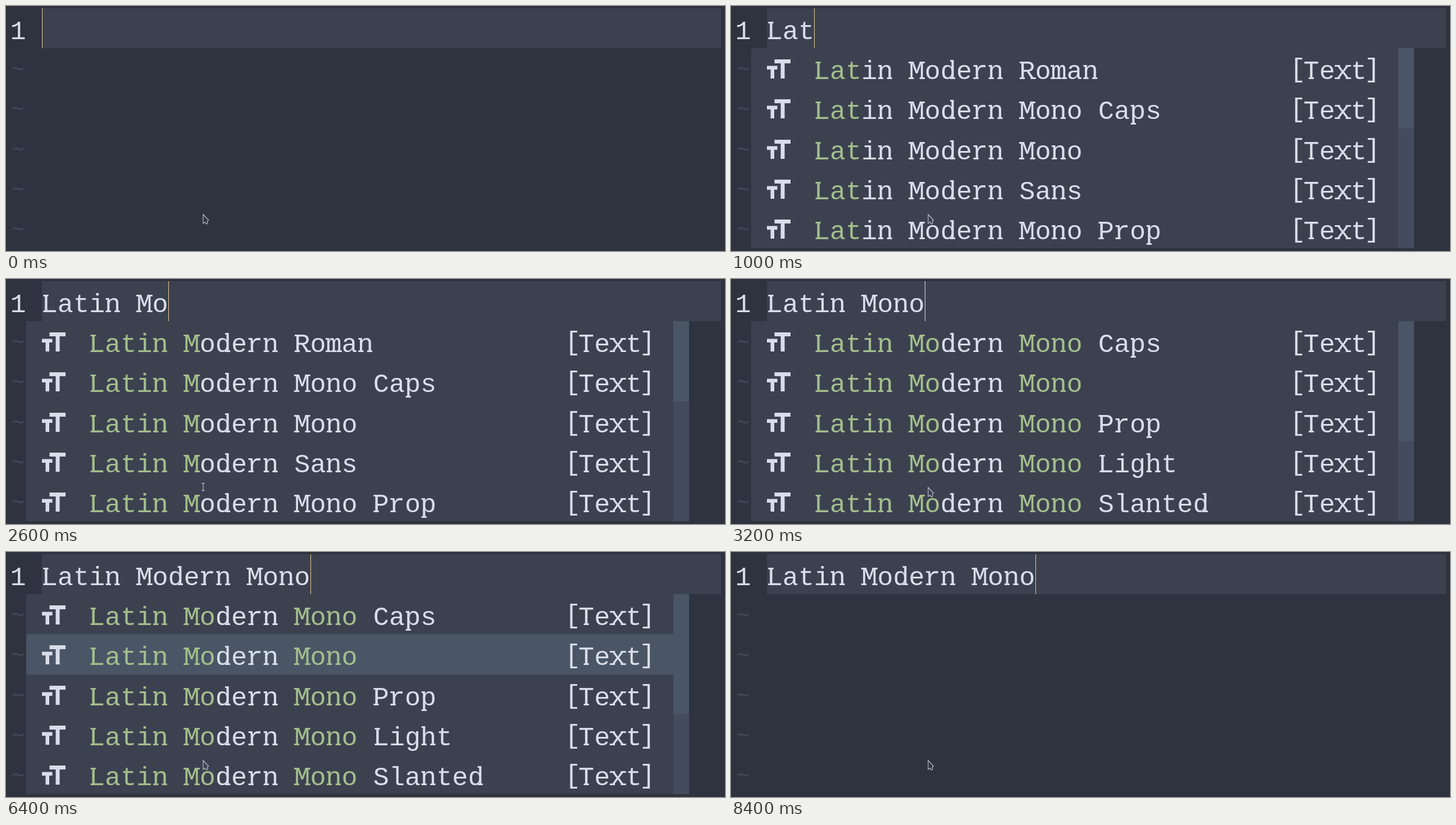
Animation, 1280 px wide and 436 px high, one loop 9000 ms. Source, as an HTML page:

```html
<!DOCTYPE html>
<html lang="en">
<head>
<meta charset="utf-8">
<title>Completion menu</title>
<style>
  html, body { margin: 0; width: 100%; height: 100%; overflow: hidden; background: #2f333f; }
  svg { display: block; width: 100vw; height: 100vh; }
  text { font: 46.83px "Liberation Mono", "Courier New", monospace; white-space: pre; }
  text.tilde { font-size: 38px; text-anchor: middle; stroke-width: .8; }
  .plain { fill: #d8dee9; stroke: #d8dee9; }
  .hit { fill: #a3be8c; stroke: #a3be8c; }
  .dim { fill: #414757; stroke: #414757; }
  text { stroke-width: 0; }
  .serif { stroke-width: 3; }
  .panel { fill: #3c4150; }
  .track { fill: #444b5d; }
  .raised { fill: #4a5566; }
  .icon { fill: #d8dee9; }
  .chevrons { fill: none; stroke: #d8dee9; stroke-width: 6.4; }
  .mouse { fill: none; stroke: #c3c8d1; stroke-width: 1.1; }
  #arrow { animation: arrow 9s step-end infinite; }
  #beam { animation: beam 9s step-end infinite; }
  @keyframes arrow { 0%, 35.5555% { opacity: 1 } 16.6666% { opacity: 0 } }
  @keyframes beam { 0%, 35.5555% { opacity: 0 } 16.6666% { opacity: 1 } }
</style>
</head>
<body>
<svg viewBox="0 0 1280 436">
  <defs>
    <path id="snippet" class="chevrons" d="M81.500 99L68.500 112L81.500 125M92.500 99L105.500 112L92.500 125"/>
    <path id="letters" class="icon" d="M77.500 95H106V102H95.500V129H88.500V102H77.500ZM64 106.500H82.500V113H77V129H70.500V113H64Z"/>
  </defs>
  <rect class="panel" x="64" y="4" width="1209" height="71"/>
  <text class="plain" x="7.500" y="59">1</text>
  <g id="tildes"></g>
  <g id="line"></g>
  <g id="menu"></g>
  <rect id="caret" y="4" width="1" height="71"/>
  <path id="arrow" class="mouse" d="M351 371V387L354.500 384.500L356.500 388L359 387L358.500 383L360.500 381Z"/>
  <path id="beam" class="mouse" d="M348 363.500H354M351 363.500V376.500M348 376.500H354"/>
</svg>
<script>
const LOOP = 9000, CELL = 28.1, ROW = 71.25, TOP = 75;
const get = id => document.getElementById(id);
const col = n => 7.5 + n * CELL;
const modern = names => names.split(',').map(n => 'Latin Modern ' + n);

const mixed = ['LGPL2~', 'LGPL3~', 'lorem~', ...modern('Roman,Mono Caps')];
const fonts = modern('Roman,Mono Caps,Mono,Sans,Mono Prop');
const monos = modern('Mono Caps,Mono,Mono Prop,Mono Light,Mono Slanted');

// head: matched letters at the start, tail: matched letters of the third word
const menu = (items, head, thumb, tail = 0, pick = -1) => ({ items, head, thumb, tail, pick });
const any = menu(mixed, 1, 1);
const latin = head => menu(fonts, head, 2);
const mono = (tail, pick) => menu(monos, 8, 3, tail, pick);

const steps = [
  [0, '', null],
  [400, 'L', null],
  [500, 'L', any],
  [700, 'La', any],
  [800, 'La', latin(2)],
  [900, 'Lat', latin(2)],
  [1000, 'Lat', latin(3)],
  [1100, 'Lati', latin(3)],
  [1200, 'Latin', latin(4)],
  [1300, 'Latin', latin(5)],
  [1500, 'Latin ', latin(5)],
  [1800, 'Latin M', latin(5)],
  [1900, 'Latin M', latin(7)],
  [2600, 'Latin Mo', latin(7)],
  [2700, 'Latin Mo', latin(8)],
  [2800, 'Latin Mon', latin(8)],
  [3000, 'Latin Mon', mono(3)],
  [3100, 'Latin Mono', mono(3)],
  [3200, 'Latin Mono', mono(4)],
  [4200, 'Latin Modern Mono Caps', mono(4, 0)],
  [6400, 'Latin Modern Mono', mono(4, 1)],
  [7700, 'Latin Modern Mono', null]
];

const rect = (cls, x, y, w, h) =>
  `<rect class="${cls}" x="${x}" y="${y}" width="${w}" height="${h}"/>`;
const text = (cls, x, y, s) => `<text class="${cls}" x="${x}" y="${y}">${s}</text>`;
const tilde = (cls, x, y) => text('tilde ' + cls, x + CELL / 2, y - 4.8, '~');
const rowTop = i => Math.round(TOP + i * ROW);
const baseline = i => rowTop(i) + 55;

// Slab serifs: top or bottom, then left, centre or right
const SERIFS = {
  L: 'tl bl', M: 'tl tr bl br', P: 'tl bl', R: 'tl bl br', T: 'bc',
  d: 'tr br', h: 'tl bl br', m: 'tl bl bc br', n: 'tl bl br',
  p: 'tl bl', r: 'tl bl', x: 'tl tr bl br'
};
const pen = document.createElement('canvas').getContext('2d');
pen.font = '46.83px "Liberation Mono", "Courier New", monospace';

function serifs(c, x, y) {
  if (!SERIFS[c]) return '';
  const m = pen.measureText(c);
  const left = -m.actualBoundingBoxLeft, right = m.actualBoundingBoxRight;
  const xs = { l: left + 2.2, c: (left + right) / 2, r: right - 2.2 };
  const ys = { t: 1.5 - m.actualBoundingBoxAscent, b: m.actualBoundingBoxDescent - 1.5 };
  return SERIFS[c].split(' ').map(([v, h]) => {
    const low = v === 't' && c > 'a' && c !== 'x';
    return `M${x + xs[h] - 4.6} ${y + ys[v]}h${low ? 6 : 9.2}`;
  }).join('');
}

function write(cls, x, y, s) {
  const d = [...s].map((c, i) => serifs(c, x + i * CELL, y)).join('');
  return text(cls, x, y, s) + `<path class="serif ${cls}" d="${d}"/>`;
}

function label(s, { head, tail }, y) {
  const name = s.replace('~', ''), cuts = [0, head, 13, 13 + tail];
  let out = cuts.map((from, i) =>
    write(i % 2 ? 'plain' : 'hit', col(5 + from), y, name.slice(from, cuts[i + 1]))).join('');
  if (name !== s) out += tilde('plain', col(5 + name.length), y);
  return out;
}

const kind = (s, y) => text('plain', col(35) + 4, y - 4, '[') +
  write('plain', col(36), y, s) + text('plain', col(36 + s.length) - 4, y - 4, ']');

function drawMenu(m) {
  if (!m) return '';
  const bar = m.items === mixed ? 1244 : 1188;
  const height = rowTop(5) - TOP;
  let out = rect('panel', 36, TOP, bar - 36, height) + rect('track', bar, TOP, 28, height) +
    rect('raised', bar, TOP, 28, rowTop(m.thumb) - TOP);
  m.items.forEach((s, i) => {
    const y = rowTop(i), snippet = s.endsWith('~');
    if (i === m.pick) out += rect('raised', 36, y, bar - 36, rowTop(i + 1) - y);
    out += `<use href="#${snippet ? 'snippet' : 'letters'}" y="${y - TOP}"/>` +
      label(s, m, baseline(i)) + kind(snippet ? 'Snippet' : 'Text', baseline(i));
  });
  return out;
}

get('tildes').innerHTML = [0, 1, 2, 3, 4].map(i => tilde('dim', col(0), baseline(i))).join('');

let shown = null;
function show(step) {
  if (step === shown) return;
  shown = step;
  const [start, typed, m] = step;
  get('line').innerHTML = write('plain', col(2), 59, typed);
  get('menu').innerHTML = drawMenu(m);
  get('caret').setAttribute('x', Math.round(64 + typed.length * CELL));
  get('caret').setAttribute('fill', start === 3200 ? '#d8dee9' : '#ebcb8b');
}

const now = () => document.timeline.currentTime ?? performance.now();
const origin = now();
function tick() {
  const t = (now() - origin) % LOOP;
  show(steps.findLast(s => s[0] <= t) || steps[0]);
  requestAnimationFrame(tick);
}
show(steps[0]);
requestAnimationFrame(tick);
</script>
</body>
</html>
```
